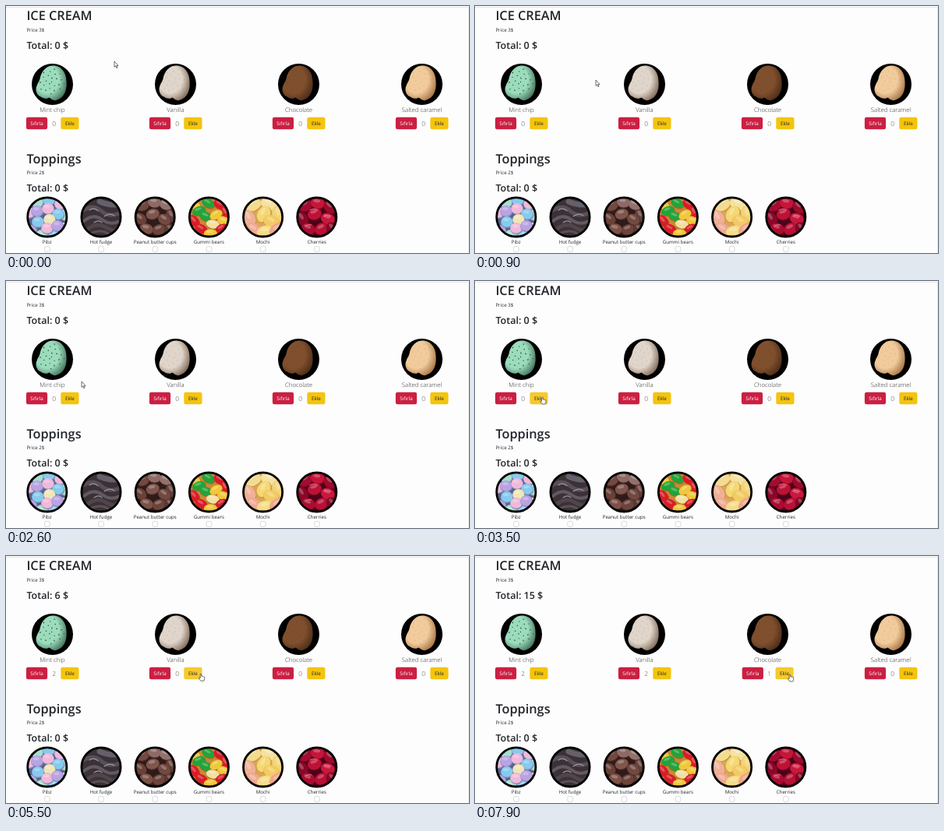
These frames come from a looping animation (594 by 317 pixels, 8 s). An HTML page:

```html
<!DOCTYPE html>
<html lang="tr">
<head>
<meta charset="utf-8">
<title>Ice cream order</title>
<style>
  html, body { margin: 0; width: 100%; height: 100%; overflow: hidden; background: #fefdfe; }
  svg { display: block; width: 594px; height: 317px; font-family: "Open Sans", "Noto Sans", sans-serif; }
  text { fill: #212529; font-size: 6.2px; text-rendering: geometricPrecision; }
  .mid { text-anchor: middle; }
  .h1 { font-size: 16.3px; font-weight: 600; }
  .h2 { font-size: 12.5px; font-weight: 600; }
  .flavour { font-size: 7.8px; font-weight: 300; fill: #333; }
  .count { font-size: 8.4px; font-weight: 300; fill: #555; }
  .reset { fill: #cb1f42; }
  .add { fill: #f4c40d; }
  .reset.hover { fill: #c01c3d; }
  .add.hover { fill: #f6c92e; }
  .button text { font-size: 6.3px; font-weight: 500; }
  .button .white { fill: #fff; }
</style>
</head>
<body>
<svg id="stage" viewBox="0 0 594 317"></svg>
<script>
const stage = document.getElementById('stage');
const text = (x, y, cls, s, id = '') => `<text x="${x}" y="${y}" class="${cls}" id="${id}">${s}</text>`;
const ellipse = (x, y, rx, ry, fill, turn = 0) =>
  `<ellipse rx="${rx}" ry="${ry}" fill="${fill}" transform="translate(${x} ${y}) rotate(${turn})"/>`;
const line = (d, color, width) =>
  `<path d="${d}" fill="none" stroke="${color}" stroke-width="${width}" stroke-linecap="round"/>`;

// Ice cream: name, lit colour, shaded colour
const flavours = [
  ['Mint chip', '#9bdcbc', '#3f6b58'],
  ['Vanilla', '#e0d5ca', '#7a6452'],
  ['Chocolate', '#80502e', '#4a2a16'],
  ['Salted caramel', '#f1cb9c', '#a3703f']
];
const centre = i => 59.5 + 158 * i;
const scoopPath = 'M-16-7C-14-18-7-24 1-24C12-24 18-14 18-4C19 8 15 17 6 20C2 22-1 19-4 17C-9 20-13 17-17 15C-21 12-22 6-20 2C-19-2-17-3-16-7Z';

function scoop(i) {
  const [, color, shade] = flavours[i];
  let art = `<radialGradient id="shade${i}" cx=".36" cy=".4" r=".72"><stop offset=".55" stop-color="${color}"/>` +
    `<stop offset="1" stop-color="${shade}"/></radialGradient>` +
    `<circle r="26.5"/><path d="${scoopPath}" fill="url(#shade${i})"/>`;
  for (let k = 0; k < 24; k++) {
    const a = k * 2.4, r = 3.5 * Math.sqrt(k);
    const x = -1 + r * Math.cos(a), y = -3 + r * Math.sin(a);
    art += i ? `<g opacity=".25">${ellipse(x, y, .9, .5, shade, k * 40)}</g>`
             : ellipse(x, y, .6 + k % 3 * .2, .65, '#27483b', k * 40);
  }
  return `<g transform="translate(${centre(i)} 100.5)">${art}</g>`;
}

const button = (i, cls, x, w, label) =>
  `<g class="button" id="${cls}${i}"><rect class="${cls}" x="${x}" y="142.7" width="${w}" height="15.6" rx="2.4"/>` +
  text(x + w / 2, 152.8, cls === 'reset' ? 'mid white' : 'mid', label) + '</g>';

const product = i => scoop(i) +
  text(centre(i), 136.3, 'mid flavour', flavours[i][0]) +
  button(i, 'reset', centre(i) - 33.6, 27.2, 'Sıfırla') +
  text(centre(i) + 2.2, 153.6, 'mid count', 0, 'count' + i) +
  button(i, 'add', centre(i) + 10.8, 23.2, 'Ekle');

// Toppings: pieces are [x, y, turn, colour], each with a darker rim
const pile = (back, rim, rx, ry, pieces) => ellipse(0, 0, 26, 26, back) +
  pieces.map(([x, y, turn, color]) =>
    ellipse(x + .5, y + .9, rx + .5, ry + .5, rim, turn) + ellipse(x, y, rx, ry, color, turn) +
    `<g opacity=".25">${ellipse(x - 1, y - ry * .4, rx * .5, ry * .3, '#fff', turn)}</g>`).join('');

function candy() {
  const blue = '#86cbee', pink = '#efb9da', mint = '#a5e0cd', purple = '#b9a3e2', cream = '#f0e6b4';
  return pile('#59638f', '#7f86b4', 7.6, 6.8, [
    [-13, -19, 0, mint], [2, -22, 0, blue], [17, -17, 0, pink], [-23, -6, 0, pink], [23, -3, 0, mint],
    [-21, 17, 0, purple], [-7, 23, 0, mint], [22, 14, 0, cream], [9, 23, 0, blue], [-13, -8, 0, purple],
    [1, -11, 0, pink], [14, -4, 0, blue], [-12, 6, 0, blue], [3, 3, 0, cream], [0, 14, 0, pink], [13, 11, 0, purple]]);
}

const fudge = () => ellipse(0, 0, 26, 26, '#3b3136') +
  line('M-2-20Q10-15 20-16', '#65606b', 7) + line('M-24-8Q-10-17 0-8T24-5', '#57505a', 5) +
  line('M-22 5Q-10-5 1 3T22 6', '#625a63', 4) + line('M-18 16Q-6 6 6 13T20 15', '#4f454b', 5) +
  line('M-14 21Q0 15 9 21', '#5b5055', 3) + line('M-15-9Q-9-13-4-8M4-1Q11-6 17-2M-9 7Q-3 3 1 7', '#9a95a0', 1.2);

const cups = () => pile('#2f1b19', '#432622', 8.6, 6.6, [
  [-16, -15, -20, '#73493f'], [-1, -19, 10, '#8d6a65'], [14, -16, 20, '#93716d'], [21, -2, 60, '#65403a'],
  [-19, 2, 40, '#6a4037'], [-3, -4, -15, '#7f564d'], [12, 3, 30, '#714940'], [-11, 15, 15, '#7c5147'],
  [5, 16, -20, '#6c443b'], [20, 16, 40, '#5d3832']]);

function gummies() {
  const red = '#d91c28', green = '#22a43b', yellow = '#f1c83a', pale = '#f3dfa0';
  return pile('#c98a35', '#b0641f', 8.6, 5.6, [
    [-18, -15, 40, yellow], [-13, -8, -20, green], [-1, -18, 30, green], [14, -16, 30, red], [21, -6, 60, red],
    [-4, -1, 20, green], [-19, 5, 50, red], [9, -3, -30, yellow], [19, 5, 20, yellow], [-10, 15, 30, red],
    [5, 9, 10, pale], [16, 15, -30, red], [2, 21, 0, yellow]]);
}

const mochi = () => pile('#d9a856', '#cf9547', 11, 8, [
  [-13, -16, -20, '#f2dc90'], [8, -17, 20, '#f4e2a4'], [20, -4, 70, '#f2d477'], [-18, 1, 60, '#f0b096'],
  [1, -4, -60, '#f4d873'], [11, 6, 30, '#f3cb62'], [-12, 16, 30, '#efa892'], [3, 19, -10, '#f5dc88'],
  [19, 16, -30, '#eea58c']]);

const cherries = () => pile('#4e0218', '#6b0620', 9, 7.2, [
  [-15, -15, -30, '#a30c30'], [1, -18, 10, '#c51539'], [17, -13, 40, '#9e0a2c'], [-19, 2, 60, '#8a0728'],
  [-3, -4, -15, '#bd1236'], [14, 2, 20, '#c8183c'], [-11, 15, 20, '#ab0d31'], [6, 15, -25, '#b91035'],
  [20, 15, 50, '#850625']]) + line('M-9-9Q-4-12 1-9M9-1Q14-4 18-1M-14 11Q-11 9-7 10', '#ef7690', 1);

const toppings = [['Pibz', candy], ['Hot fudge', fudge], ['Peanut butter cups', cups],
  ['Gummi bears', gummies], ['Mochi', mochi], ['Cherries', cherries]];

function topping([name, art], i) {
  const x = 52.8 + 69.2 * i;
  return `<g transform="translate(${x} 270.9)"><g clip-path="url(#disc)">${art()}</g>` +
    '<circle r="25.1" fill="none" stroke="#000" stroke-width="2.8"/></g>' +
    text(x, 304.6, 'mid', name) +
    `<rect x="${x - 3.2}" y="308.7" width="6.6" height="6.6" rx="1.6" fill="#fff" stroke="#bfc2c5" stroke-width=".6"/>`;
}

stage.innerHTML = '<clipPath id="disc"><circle r="25.5"/></clipPath>' +
  '<path d="M0 1.5H593.5V317" fill="none" stroke="#e4e3e5"/>' +
  text(26.4, 18.2, 'h1', 'ICE CREAM') + text(26.4, 32.8, '', 'Price 3$') + text(26.4, 55, 'h2', '', 'total') +
  flavours.map((_, i) => product(i)).join('') +
  text(26.4, 201.8, 'h1', 'Toppings') + text(26.4, 215.8, '', 'Price 2$') + text(26.4, 238, 'h2', 'Total: 0 $') +
  toppings.map(topping).join('') +
  '<g id="cursor" fill="#fff" stroke="#222" stroke-width=".65" stroke-linejoin="round">' +
  '<path id="arrow" d="M0 0V7.4L1.7 5.9L2.9 8.6L4 8.1L2.8 5.5H5Z"/>' +
  '<path id="hand" d="M-.8.5Q0-.6.8.5V3Q1.7 2.5 2.2 3.3Q3.1 2.8 3.5 3.7Q4.6 3.4 4.7 4.5V6.6L3.8 9H-.2L-2.6 5.7Q-2.5 4.5-.8 5.4Z"/></g>';

// Time, x, y of the pointer tip
const path = [
  [0, 139, 71], [900, 155, 95], [1200, 163, 88], [1400, 163, 88], [1800, 225, 34], [2000, 215, 40],
  [2600, 97, 129], [3200, 85, 149], [4100, 90, 149], [4900, 90, 149], [5300, 270, 152], [5600, 243, 151],
  [6000, 243, 151], [6500, 361, 152], [6700, 361, 152], [7200, 421, 154], [7500, 404, 152], [8000, 404, 152]
];
const clicks = [[4200, 0], [4900, 0], [5700, 1], [5900, 1], [7600, 2]];
const byId = id => document.getElementById(id);

function pointer(t) {
  const k = path.findIndex(p => p[0] > t);
  const [t0, x0, y0] = path[k - 1], [t1, x1, y1] = path[k];
  const u = (t - t0) / (t1 - t0), e = u * u * (3 - 2 * u);
  return [x0 + (x1 - x0) * e, y0 + (y1 - y0) * e];
}

function draw(now) {
  const t = Math.floor(now % 8000 / 100) * 100;
  const [x, y] = pointer(t);
  const done = clicks.filter(c => c[0] <= t);
  let over = false;
  byId('total').textContent = `Total: ${done.length * 3} $`;
  flavours.forEach((_, i) => {
    const count = done.filter(c => c[1] === i).length;
    const inset = count === 1 ? .8 : 0;
    byId('count' + i).textContent = count;
    for (const [cls, from, to, side] of [['reset', -33.6, -6.4, 1], ['add', 10.8, 34, -1]]) {
      const dx = x - centre(i), node = byId(cls + i);
      const hover = dx > from && dx < to && y > 142.7 && y < 158.3;
      over = over || hover;
      node.setAttribute('transform', `translate(${inset * side})`);
      node.firstChild.classList.toggle('hover', hover);
    }
  });
  byId('cursor').setAttribute('transform', `translate(${x} ${y})`);
  byId('hand').style.display = over ? '' : 'none';
  byId('arrow').style.display = over ? 'none' : '';
}

const start = performance.now();
function loop() {
  draw(performance.now() - start);
  requestAnimationFrame(loop);
}
loop();
</script>
</body>
</html>
```
